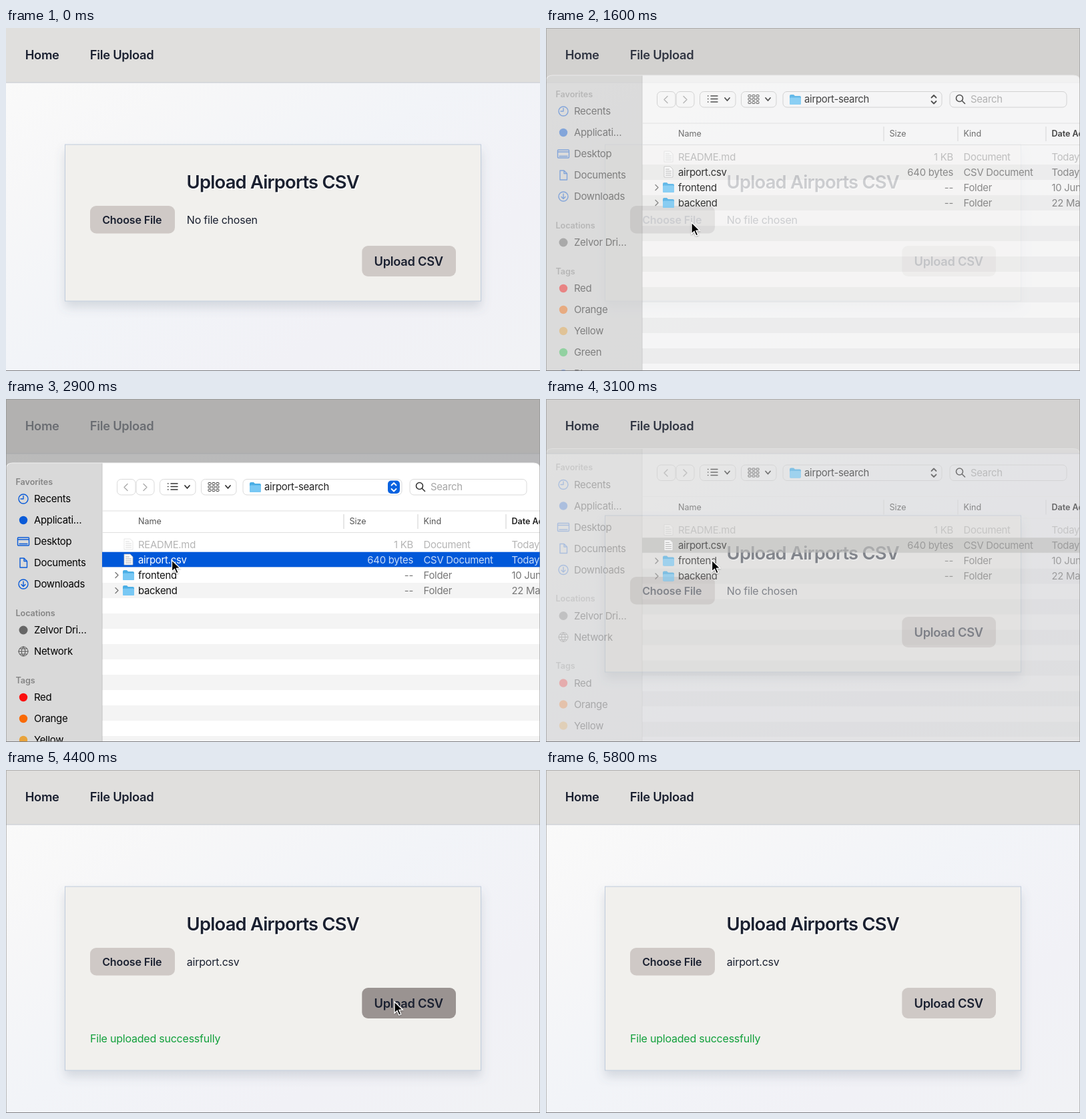
Write an HTML page that moves like this. It is 800 by 515 pixels and loops after 5900 ms.

```html
<!DOCTYPE html>
<html lang="en">
<head>
<meta charset="utf-8">
<title>Airports upload</title>
<style>
  html, body { margin: 0; width: 100%; height: 100%; overflow: hidden; background: #f4f5f8; }
  svg { display: block; width: 800px; height: 515px; }
  text { font-family: Inter, Roboto, sans-serif; font-size: 14.9px; letter-spacing: -.27px; white-space: pre; }
  .page { font-size: 16px; letter-spacing: -.22px; fill: #1a2030; }
  .nav { font-size: 18.3px; font-weight: 600; letter-spacing: -.28px; }
  .title { font-size: 27.4px; font-weight: 600; letter-spacing: -.82px; }
  .bold { font-weight: 600; letter-spacing: -.12px; }
  .small { font-size: 12.6px; letter-spacing: -.05px; }
  .line { fill: none; stroke-width: 1.4; stroke-linecap: round; stroke-linejoin: round; }
  .control { fill: #fff; stroke: #dadada; }
  .inactive .control { fill: none; stroke: #ccc; }
</style>
</head>
<body>
<svg id="stage" viewBox="0 0 800 515"></svg>
<script>
const LOOP = 5900, STEP = 100;
const BLUE = '#0a5bd8';

const text = (x, y, value, cls = '', fill = '', extra = '') =>
  `<text x="${x}" y="${y}" class="${cls}" ${fill && `fill="${fill}"`} ${extra}>${value}</text>`;
const rect = (x, y, w, h, attrs) => `<rect x="${x}" y="${y}" width="${w}" height="${h}" ${attrs}/>`;
const line = (d, color = '#444', extra = '') => `<path class="line" d="${d}" stroke="${color}" ${extra}/>`;
const chevron = (x, y, color = '#333') => line(`M${x - 3.5} ${y - 2}l3.5 4l3.5 -4`, color, 'style="stroke-width:1.8"');
const folder = (x, y) =>
  `<path d="M${x} ${y + 2}q0 -2 2 -2h4l2 2h7q2 0 2 2v9q0 2 -2 2h-13q-2 0 -2 -2z" fill="#4aaee5"/>` +
  rect(x, y + 4.5, 17, 10.5, 'rx="1.5" fill="#78c8f4"');
const sheetOfPaper = (x, y) =>
  `<path d="M${x} ${y}h9l4 4v12h-13z" fill="#fdfdfd" stroke="#b9b9b9" stroke-width=".8"/>` +
  line(`M${x + 2.5} ${y + 4}h5M${x + 2.5} ${y + 7}h8M${x + 2.5} ${y + 10}h8M${x + 2.5} ${y + 13}h8`, '#aaa', 'style="stroke-width:1"');

function pageMarkup() {
  return rect(0, 0, 800, 515, 'fill="url(#sky)"') +
    rect(0, 0, 800, 82, 'fill="#e0dfdd"') + rect(0, 81.5, 800, 1, 'fill="#c6cad1"') +
    text(28.7, 47, 'Home', 'page nav') + text(125.8, 47, 'File Upload', 'page nav') +
    rect(88.5, 175, 623, 235, 'id="card" fill="#f1f0ed" stroke="#c0ccdc" filter="url(#drop)"') +
    text(272, 242.5, 'Upload Airports CSV', 'page title', '', 'style="fill:#fff"') +
    text(270.6, 241, 'Upload Airports CSV', 'page title') +
    rect(126, 267, 127, 41.5, 'id="choose" rx="9"') + text(144.2, 293.7, 'Choose File', 'page bold') +
    text(270.8, 293.7, '', 'page', '', 'id="fileName"') +
    rect(533.3, 327, 140.7, 46, 'id="upload" rx="9"') + text(551.5, 356.7, 'Upload CSV', 'page nav') +
    text(126, 408.7, 'File uploaded successfully', 'page', '', 'id="success" style="fill:#12a03c"');
}

function sidebarMarkup() {
  const heading = (y, value) => text(14.5, y + 4.5, value, 'small bold', '#858585');
  const item = (y, label, icon) => line(icon, BLUE) + text(42, y + 5.3, label);
  const ring = (x, y, r) => `M${x - r} ${y}a${r} ${r} 0 1 0 ${2 * r} 0a${r} ${r} 0 1 0 ${-2 * r} 0`;
  const disc = (y, color) => `<circle cx="26" cy="${y}" r="6.2" fill="${color}"/>`;
  const tags = [['Red', '#fb0f0f'], ['Orange', '#f96a06'], ['Yellow', '#e8a33c'], ['Green', '#2fc552'], ['Blue', '#2a72ee']];
  return heading(124, 'Favorites') +
    item(150, 'Recents', ring(26, 150, 7) + 'M26 145.5v4.5h-4') +
    disc(182, BLUE) + text(42, 187.3, 'Applicati…') +
    item(214, 'Desktop', 'M18.5 208h15q1 0 1 1v10q0 1 -1 1h-15q-1 0 -1 -1v-10q0 -1 1 -1zM18 211h16M20 217.5h12') +
    item(246, 'Documents', 'M21 239h6l4.5 4.5v9.5h-10.5zM27 239v4.5h4.5') +
    item(278, 'Downloads', ring(26, 278, 7) + 'M26 274v7.5m-3 -3l3 3l3 -3') +
    heading(321, 'Locations') +
    `<circle cx="26" cy="347" r="6.5" fill="#666"/>` + text(42, 352.3, 'Zelvor Dri…') +
    `<g id="network">${line(ring(26, 379, 7) + 'M19 379h14M26 372q-6 7 0 14q6 -7 0 -14M20.5 375h11M20.5 383h11', '#555', 'style="stroke-width:1"') + text(42, 384.3, 'Network')}</g>` +
    `<g id="tags">${heading(422, 'Tags') + tags.map(([name, color], i) =>
      disc(448 + 32 * i, color) + text(42, 453.3 + 32 * i, name)).join('')}</g>`;
}

function toolbarMarkup() {
  const box = (x, w) => rect(x, 120.5, w, 23.5, 'rx="6" class="control"');
  let grid = '';
  for (let i = 0; i < 9; i++)
    grid += rect(303 + i % 3 * 6, 125.5 + Math.floor(i / 3) * 5, 4, 3, 'rx=".6" fill="none" stroke="#444"');
  return box(166.5, 27.5) + box(195, 27) + box(230.5, 53.5) + box(292.5, 52.5) + box(355, 238) + box(605, 175) +
    line('M182 127.5l-5 5l5 5M206 127.5l5 5l-5 5', '#aaa') +
    line('M247 127h10M247 131.5h10M247 136h10M242.5 127h.5M242.5 131.5h.5M242.5 136h.5', '#333') +
    chevron(271.5, 132) + grid + chevron(332.5, 132) +
    folder(365, 125) + text(387, 137, 'airport-search', '', '#222') +
    rect(572, 122.5, 18, 19.5, 'id="popup" rx="5" fill="#0a63e0"') +
    line('M577.5 129.5l3.5 -3.5l3.5 3.5M577.5 135l3.5 3.5l3.5 -3.5', '', 'id="arrows" style="stroke-width:1.8"') +
    line('M614.5 130.5a5 5 0 1 0 10 0a5 5 0 1 0 -10 0M623.5 134.5l4 4', '#333', 'style="stroke-width:1.6"') +
    text(636, 137.3, 'Search', '', '#a6a6a6');
}

function listMarkup() {
  const heads = [[198, 'Name'], [514.5, 'Size'], [625.5, 'Kind']];
  const row = (i, name, size, kind, date, icon, open) => {
    const y = 218.5 + 23 * i, dim = i === 0;
    const tone = dim ? '#b5b5b5' : '#777';
    return `<g class="row">${icon}${open ? line(`M164 ${y - 4}l4 4l-4 4`, '#777') : ''}` +
      text(198, y + 5, name, 'name', dim ? '#b5b5b5' : '#111') +
      text(610, y + 5, size, 'info', tone, 'text-anchor="end"') +
      text(625.5, y + 5, kind, 'info', tone) + text(757.5, y + 5, date, 'info', tone) + '</g>';
  };
  return rect(144, 167.5, 656, 1, 'fill="#e0e0e0"') + rect(144, 200, 656, 1, 'fill="#e0e0e0"') +
    heads.map(([x, label]) => text(x, 188.3, label, 'small', '#555')).join('') +
    text(757.5, 188.3, 'Date Added', 'small bold', '#222') +
    [505.5, 616.5, 748.5].map(x => rect(x, 173, 1, 22, 'fill="#d0d0d0"')).join('') +
    rect(144, 229.7, 656, 22.6, 'id="selection"') +
    row(0, 'README.md', '1 KB', 'Document', 'Today', `<g opacity=".4">${sheetOfPaper(177, 210)}</g>`) +
    row(1, 'airport.csv', '640 bytes', 'CSV Document', 'Today', sheetOfPaper(177, 233)) +
    row(2, 'frontend', '--', 'Folder', '10 June', folder(175, 257), true) +
    row(3, 'backend', '--', 'Folder', '22 May', folder(175, 280), true);
}

function sheetMarkup() {
  let stripes = '';
  for (let y = 230; y < 620; y += 46) stripes += rect(144, y, 656, 23, 'fill="#000" opacity=".045"');
  return `<g id="panel">
      <path id="content" d="M144 96h646q10 0 10 10v530h-656z"/>
      <path d="M0 636v-530q0 -10 10 -10h134v540z" fill="#d9d9d9"/>
      ${rect(143.5, 96, 1, 540, 'fill="#c8c8c8"')}${stripes}
      ${line('M0 106q0 -10 10 -10h780q10 0 10 10', '#f2f2f2', 'style="stroke-width:1.2"')}
    </g>
    <g id="sidebar">${sidebarMarkup()}</g>
    <g id="main">${toolbarMarkup()}${listMarkup()}</g>`;
}

const stage = document.getElementById('stage');
stage.innerHTML = `<defs>
    <linearGradient id="sky" x1="0" y1="0" x2="1" y2="1">
      <stop offset="0" stop-color="#fbfbfa"/><stop offset=".25" stop-color="#f7f7f8"/>
      <stop offset=".5" stop-color="#f2f4f8"/>
      <stop offset=".75" stop-color="#f1f1f6"/><stop offset="1" stop-color="#f1f2f5"/>
    </linearGradient>
    <filter id="drop" x="-10%" y="-10%" width="120%" height="140%">
      <feDropShadow dx="0" dy="9" stdDeviation="7.5" flood-color="#5c6678" flood-opacity=".2"/>
    </filter>
    <filter id="soft"><feDropShadow dx="0" dy="1" stdDeviation="1" flood-opacity=".35"/></filter>
  </defs>
  ${pageMarkup()}
  ${rect(0, 0, 800, 515, 'id="dim" fill="#989898"')}
  <g id="sheet">${sheetMarkup()}</g>
  ${rect(.5, .5, 799, 514, 'id="frame" fill="none" stroke="#8a8a8a" stroke-opacity=".55"')}
  ${rect(0, 514, 800, 1, 'fill="#808084"')}
  <path id="cursor" d="M0 0V17L4 13.3L6.8 19.8L9.7 18.6L6.9 12.3L12.3 12Z"
    fill="#000" stroke="#fff" stroke-width="1.3" filter="url(#soft)"/>`;

const el = {};
stage.querySelectorAll('[id]').forEach(node => el[node.id] = node);
const set = (id, attrs) => { for (const key in attrs) el[id].setAttribute(key, attrs[key]); };
const show = (id, on) => set(id, { visibility: on ? 'visible' : 'hidden' });
const csvRow = stage.querySelectorAll('.row')[1];

// Each key is [time, ...values]; values are eased between neighbouring keys.
function sample(keys, t, ease = k => k) {
  const next = keys.findIndex(key => key[0] > t);
  if (next === 0) return keys[0].slice(1);
  if (next < 0) return keys[keys.length - 1].slice(1);
  const a = keys[next - 1], b = keys[next], k = ease((t - a[0]) / (b[0] - a[0]));
  return a.slice(1).map((v, i) => v + (b[i + 1] - v) * k);
}
const smooth = k => k * k * (3 - 2 * k);

const CURSOR = [[300, 296, 346], [700, 217, 311], [1000, 218, 292], [1900, 218, 292], [2400, 248.5, 242],
  [3300, 248.5, 242], [3900, 582, 348], [5000, 582, 348], [5600, 455, 312]];
// Offset, panel opacity, list opacity, sidebar opacity, page dimming.
const SHEET = [[1400, -50, 0, 0, 0, 0], [1500, -38, .4, .45, .2, .08], [1600, -25, .77, .85, .42, .18],
  [1700, -8, .95, .97, 1, .45], [1800, 0, 1, 1, 1, .64], [3000, 0, 1, 1, 1, .64],
  [3100, -21.5, .44, .64, .24, .19], [3200, -44, .06, .1, .04, .05], [3300, -50, 0, 0, 0, 0]];

function draw(time) {
  const t = Math.floor(time % LOOP / STEP) * STEP;
  const [x, y] = sample(CURSOR, t, smooth);
  const [dy, panel, list, sidebar, dim] = sample(SHEET, t);
  const active = t >= 1700 && t <= 3000;
  const closing = t > 3000;
  const chosen = t >= 3200, done = t >= 4100;
  const within = (l, top, r, b) => x > l && x < r && y > top && y < b;
  const tone = hover => hover ? '#9a9391' : '#cfc9c6';

  set('card', { height: done ? 276 : 235 });
  set('choose', { fill: tone(t >= 300 && within(126, 267, 253, 308)) });
  set('upload', { fill: tone(within(533, 327, 674, 373)) });
  el.fileName.textContent = chosen ? 'airport.csv' : 'No file chosen';
  show('success', done);

  set('dim', { opacity: dim });
  set('sheet', {
    transform: `translate(0 ${dy})`,
    display: panel ? 'inline' : 'none',
    class: active ? '' : 'inactive'
  });
  set('panel', { opacity: panel });
  set('content', { fill: closing ? '#e6e6e6' : active ? '#fff' : '#fbfbfb' });
  set('main', { opacity: list });
  set('sidebar', { opacity: sidebar });
  show('popup', active);
  set('arrows', { stroke: active ? '#fff' : '#333' });

  const network = t >= 1700;
  show('network', network);
  set('tags', { transform: `translate(0 ${network ? 0 : -32})` });

  const selected = t >= 2500;
  show('selection', selected);
  set('selection', { fill: closing ? '#c4c4c2' : '#0058d9' });
  const lit = selected && !closing;
  csvRow.querySelector('.name').setAttribute('fill', lit ? '#fff' : '#111');
  csvRow.querySelectorAll('.info').forEach(n => n.setAttribute('fill', lit ? '#c9dcf8' : '#777'));

  show('frame', t >= 1300);
  show('cursor', t >= 300 && t <= 5600);
  set('cursor', { transform: `translate(${x} ${y})` });
}

const start = performance.now();
(function tick() {
  draw(performance.now() - start);
  requestAnimationFrame(tick);
})();
</script>
</body>
</html>
```
